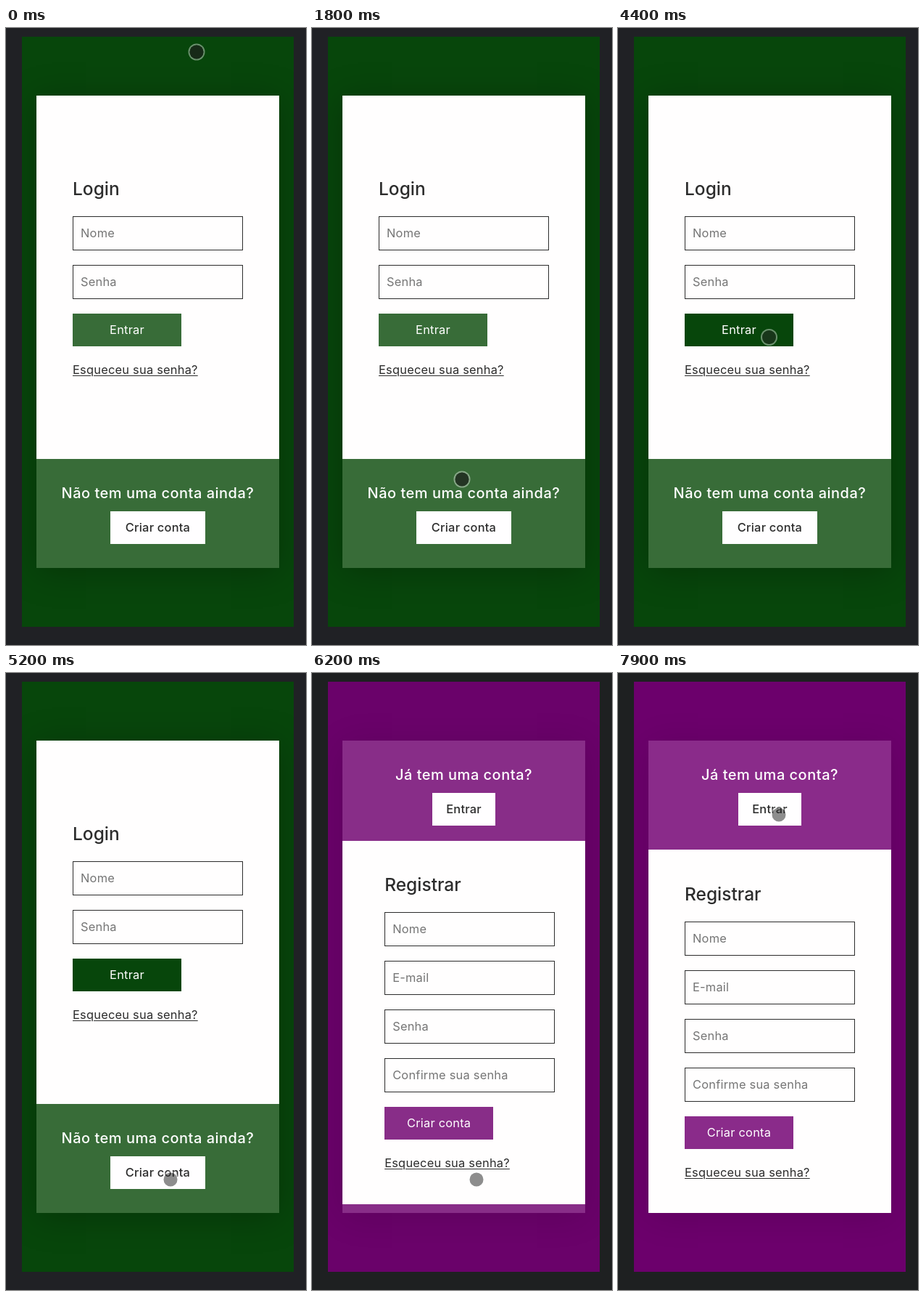
An HTML page for the animation above (8000 ms loop, 414 by 849 pixels).

```html
<!DOCTYPE html>
<html lang="pt-BR">
<head>
<meta charset="utf-8">
<title>Login e registro</title>
<style>
  html, body { margin: 0; width: 100%; height: 100%; overflow: hidden; background: #202125; }
  body { position: relative; font: 16.4px/24px Inter, sans-serif; letter-spacing: .014em; color: #2c2c2c; }
  div { position: absolute; box-sizing: border-box; white-space: nowrap; }
  #screen { left: 22px; top: 12px; width: 375px; height: 812px; overflow: hidden; background: var(--page); }
  #card { left: 20px; top: 81px; width: 335px; height: 650px; background: var(--bar); box-shadow: 0 5px 45px rgba(0, 0, 0, var(--shade)); }
  .side { width: 335px; height: 150px; text-align: center; }
  .ask { width: 100%; top: 32px; line-height: 30px; font-size: 20px; font-weight: 500; letter-spacing: .025em; color: #fff; }
  .switch { top: 72px; height: 45px; line-height: 45px; font-weight: 500; background: #fffeff; }
  #sheet { width: 335px; height: 500px; overflow: hidden; background: #fffefe; }
  .form { width: 335px; height: 500px; }
  .form div { left: 50px; }
  .title { font-size: 24.5px; line-height: 36px; font-weight: 500; letter-spacing: 0; }
  .field { width: 235px; height: 47px; padding-left: 10px; line-height: 45px; border: 1px solid #2c2c2c; color: #757575; }
  .submit { width: 150px; height: 45px; line-height: 45px; text-align: center; color: #fff; background: var(--bar); }
  .link { text-decoration: underline 1px; text-underline-offset: 2px; }
  #touch { left: -9.5px; top: -9.5px; width: 19px; height: 19px; border-radius: 50%; box-shadow: 0 0 0 2px rgba(255, 255, 255, .4); }
</style>
</head>
<body>
<div id="screen">
  <div id="card">
    <div class="side" style="top:0">
      <div class="ask">Já tem uma conta?</div>
      <div class="switch" style="left:124px;width:87px">Entrar</div>
    </div>
    <div class="side" style="top:500px">
      <div class="ask">Não tem uma conta ainda?</div>
      <div class="switch" style="left:102px;width:131px">Criar conta</div>
    </div>
    <div id="sheet">
      <div class="form" id="login"></div>
      <div class="form" id="register"></div>
    </div>
  </div>
</div>
<div id="touch"></div>
<script>
const $ = id => document.getElementById(id);

function buildForm(id, top, title, fields, action) {
  const row = (kind, y, text) => `<div class="${kind}" style="top:${y}px">${text}</div>`;
  const end = top + 56 + fields.length * 67;
  $(id).innerHTML = row('title', top, title)
    + fields.map((name, i) => row('field', top + 56 + i * 67, name)).join('')
    + row('submit', end, action)
    + row('link', end + 65, 'Esqueceu sua senha?');
}
buildForm('login', 110, 'Login', ['Nome', 'Senha'], 'Entrar');
buildForm('register', 42.7, 'Registrar', ['Nome', 'E-mail', 'Senha', 'Confirme sua senha'], 'Criar conta');
const loginButton = document.querySelector('#login .submit');

// CSS-style cubic-bezier easing, solved by bisection
function bezier(x1, y1, x2, y2) {
  const curve = (a, b, u) => 3 * a * u * (1 - u) ** 2 + 3 * b * u * u * (1 - u) + u ** 3;
  return x => {
    if (x <= 0 || x >= 1) return x <= 0 ? 0 : 1;
    let lo = 0, hi = 1;
    for (let i = 0; i < 30; i++) {
      const mid = (lo + hi) / 2;
      if (curve(x1, x2, mid) < x) lo = mid; else hi = mid;
    }
    return curve(y1, y2, lo);
  };
}
const ease = bezier(.25, .1, .25, 1);
const easeInOut = bezier(.42, 0, .58, 1);
const lerp = (a, b, k) => a + (b - a) * k;
const mix = (a, b, k) => `rgb(${a.map((v, i) => Math.round(lerp(v, b[i], k)))})`;

const GREEN = [7, 70, 11], PURPLE = [108, 0, 108];
const GREEN_BAR = [56, 108, 56], PURPLE_BAR = [138, 43, 138];
const LOOP = 8000, STEP = 100;
const TAP_LOGIN = 4300, TAP_SWITCH = 5200, LIFT = 6700, TAP_BACK = 7900;

// Pointer strokes: a smooth curve through evenly timed points, resting in between
const idle = [262.5, 32.5], onEntrar = [190.5, 423.5], onCriar = [226.5, 696.5];
const strokes = [
  { start: 300, gap: 200, points: [idle, [268, 64], [372, 240], [400, 540], [239.5, 662.5]] },
  { start: 1200, gap: 200, points: [[239.5, 662.5], [182, 605], [213, 634], [206.5, 620.5], [202.5, 466], [193.5, 433.5], onEntrar] },
  { start: 3600, gap: 400, points: [onEntrar, [209, 470], [208, 425], [226, 584], onCriar] },
  { start: 6600, gap: 200, points: [onCriar, [240, 685], [305, 590], [320, 380], [245, 220], [221.5, 194.5]] }
];

function catmullRom(a, b, c, d, u) {
  return b + u / 2 * (c - a + u * (2 * a - 5 * b + 4 * c - d + u * (3 * (b - c) + d - a)));
}

function pointerAt(t) {
  const { start, gap, points } = strokes.findLast(s => s.start <= t) ?? strokes[0];
  const last = points.length - 1;
  const pos = Math.min(Math.max((t - start) / gap, 0), last);
  const i = Math.min(Math.floor(pos), last - 1);
  const at = n => points[Math.min(Math.max(n, 0), last)];
  return [0, 1].map(axis =>
    catmullRom(at(i - 1)[axis], at(i)[axis], at(i + 1)[axis], at(i + 2)[axis], pos - i));
}

function draw(t) {
  const x = (t - 5880) / 400;
  const k = ease(x);
  const root = document.body.style;
  root.setProperty('--page', mix(GREEN, PURPLE, k));
  root.setProperty('--bar', mix(GREEN_BAR, PURPLE_BAR, k));
  root.setProperty('--shade', lerp(.25, .12, k));
  root.background = mix([32, 33, 37], [30, 32, 33], k);

  $('sheet').style.top = 150 * easeInOut(x) + 'px';
  $('login').style.left = -335 * k + 'px';
  $('register').style.left = 335 * (1 - k) + 'px';
  loginButton.style.background = t < TAP_LOGIN ? '' : mix(GREEN, PURPLE_BAR, k);

  const [px, py] = pointerAt(t);
  const pressed = (t >= TAP_LOGIN && t < TAP_LOGIN + 200) || (t >= TAP_SWITCH && t < LIFT) || t >= TAP_BACK;
  $('touch').style.transform = `translate(${px}px, ${py}px)`;
  $('touch').style.background = pressed ? 'rgba(40, 40, 40, .53)' : 'rgba(30, 32, 30, .74)';
}

function frame() {
  const t = performance.now() % LOOP;
  draw(Math.floor(t / STEP) * STEP);
  requestAnimationFrame(frame);
}
frame();
</script>
</body>
</html>
```
